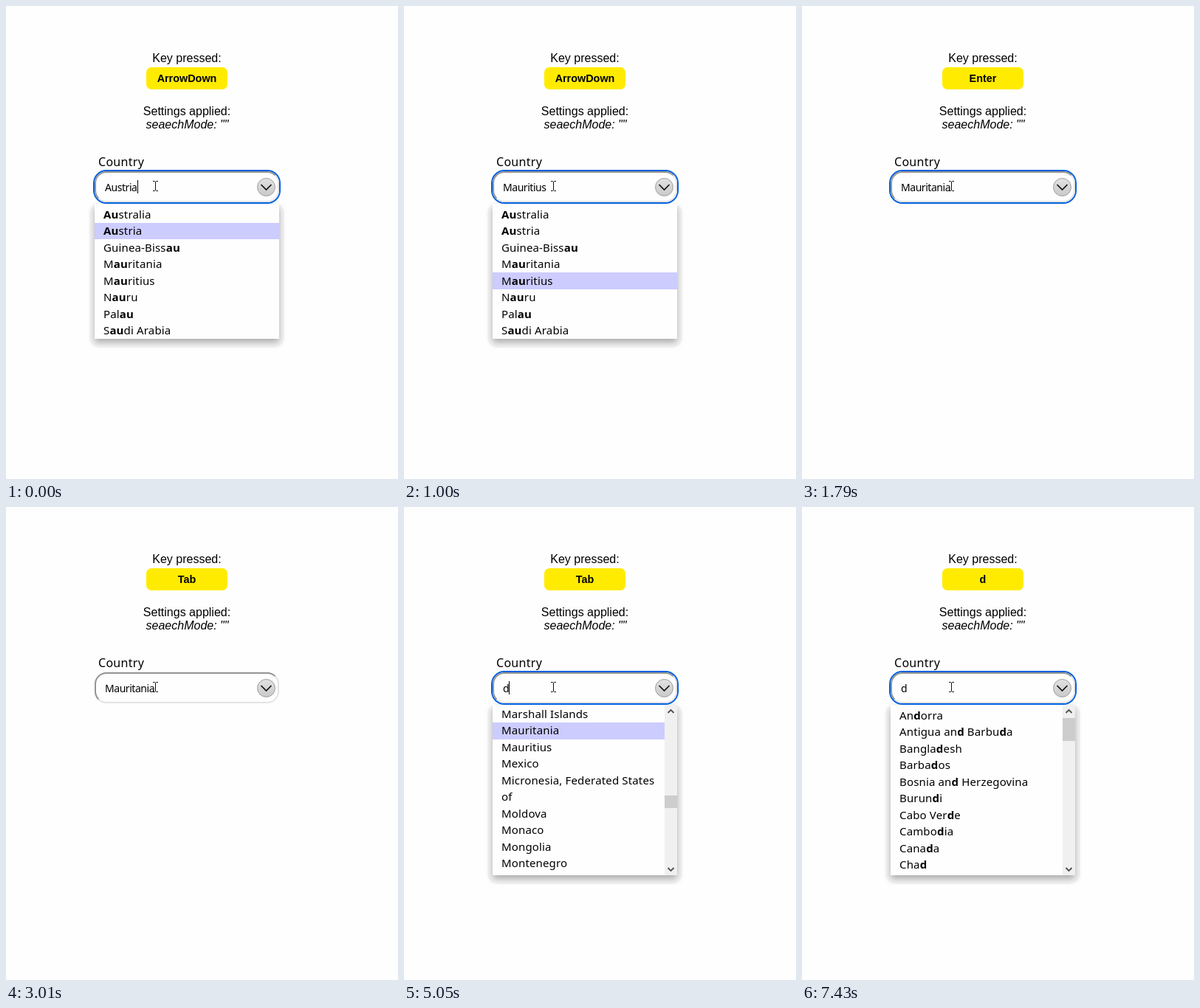
Write an HTML page that moves like this. It is 531x641 px and loops after 7.99 s.

```html
<!DOCTYPE html>
<html lang="en">
<head>
<meta charset="utf-8">
<title>Country combobox</title>
<style>
  html, body { margin: 0; width: 100%; height: 100%; overflow: hidden; background: #fefefe; }
  svg { display: block; }
  text { white-space: pre; }
  .head { font: 16px "Liberation Sans", Arial, sans-serif; text-anchor: middle; }
  .mode { font-style: italic; }
  .key { font: bold 14.4px "Liberation Sans", Arial, sans-serif; text-anchor: middle; }
  .label { font: 16px "Noto Sans", sans-serif; letter-spacing: .28px; }
  .value { font: 14px "Noto Sans", sans-serif; letter-spacing: -.45px; }
  .row { font: 15px "Noto Sans", sans-serif; letter-spacing: .15px; }
  .row tspan { font-weight: bold; }
</style>
</head>
<body>
<svg width="531" height="641" viewBox="0 0 531 641">
  <defs>
    <linearGradient id="knob" x2="0" y2="1">
      <stop stop-color="#e2e2e2"/>
      <stop offset="1" stop-color="#c9c9c9"/>
    </linearGradient>
    <filter id="soft" filterUnits="userSpaceOnUse" x="90" y="240" width="310" height="300">
      <feGaussianBlur stdDeviation="5"/>
    </filter>
    <clipPath id="view"><rect id="viewBox" x="120" y="268" width="250"/></clipPath>
  </defs>

  <text class="head" x="245" y="76">Key pressed:</text>
  <rect x="190" y="83" width="110" height="30" rx="7" fill="#ffeb00"/>
  <text class="key" id="key" x="245" y="103"></text>
  <text class="head" x="245" y="148">Settings applied:</text>
  <text class="head mode" x="245.5" y="166">seaechMode: ""</text>
  <text class="label" x="125" y="217">Country</text>

  <g id="list">
    <rect id="halo" x="113" y="267" width="264" rx="14" fill="#f5f5f5"/>
    <rect id="shade" x="120" y="273" width="250" fill-opacity=".3" filter="url(#soft)"/>
    <rect id="panel" x="120" y="268" width="250" fill="#fefefe"/>
    <g clip-path="url(#view)">
      <rect id="mark" x="120" fill="#ccf"/>
      <g id="rows"></g>
    </g>
    <g id="bar">
      <rect x="353" y="268" width="17" height="231" fill="#f0f0f0"/>
      <rect id="thumb" x="353" width="17" fill="#cdcdcd"/>
      <path d="M357.5 279l4-4 4 4M357.5 489l4 4 4-4" fill="none" stroke="#505050" stroke-width="1.8"/>
    </g>
  </g>

  <rect id="ring" x="119" y="223" width="252" height="44" rx="17" fill="#fefefe" stroke="#0060df" stroke-width="2"/>
  <g fill="none" stroke-width="2">
    <rect x="121" y="225" width="248" height="40" rx="15" fill="#fefefe" stroke="#e3e3e3"/>
    <path d="M125.4 260.6A15 15 0 0 1 121 250V240A15 15 0 0 1 136 225H354A15 15 0 0 1 364.6 229.4" stroke="#949494"/>
  </g>
  <circle cx="352.5" cy="245.5" r="12" fill="url(#knob)" stroke="#a0a0a0"/>
  <path d="M345.5 242l7 7 7-7" fill="none" stroke="#111" stroke-width="1.7"/>

  <rect id="pick" x="134" y="236" width="67" height="18" fill="#0078d7"/>
  <text class="value" id="value" x="134" y="251"></text>
  <rect id="caret" y="236" width="1" height="18"/>
  <path d="M199 237.5h2.5l1 1 1-1h2.5M202.5 238v12M199 250.5h2.5l1-1 1 1h2.5" fill="none" stroke="#111"/>
</svg>
<script>
const LOOP = 7990, PITCH = 22.5, LIST_TOP = 268;
const $ = id => document.getElementById(id);

const lists = {
  au: {
    names: ["Australia", "Austria", "Guinea-Bissau", "Mauritania", "Mauritius", "Nauru", "Palau", "Saudi Arabia"],
    top: 271.5, bottom: 451, match: /(au)/i
  },
  all: {
    names: ["Marshall Islands", "Mauritania", "Mauritius", "Mexico", "Micronesia, Federated States", "of",
      "Moldova", "Monaco", "Mongolia", "Montenegro"],
    top: 269.7, bottom: 499, thumb: [391, 17]
  },
  d: {
    names: ["Andorra", "Antigua and Barbuda", "Bangladesh", "Barbados", "Bosnia and Herzegovina", "Burundi",
      "Cabo Verde", "Cambodia", "Canada", "Chad"],
    top: 271.5, bottom: 499, match: /(d)/i, thumb: [286, 31]
  }
};

const caretAt = { "Austria": 178, "Guinea-Bissau": 223, "Mauritania": 200, "Mauritius": 191, "d": 142 };

// Each step lists only what changes at that time.
const steps = [
  [0, { key: "ArrowDown", value: "Austria", list: "au", row: 1, caret: true, focus: true, picked: false }],
  [120, { value: "Guinea-Bissau", row: 2 }],
  [330, { value: "Mauritania", row: 3 }],
  [450, { value: "Mauritius", row: 4 }],
  [940, { caret: false }],
  [1060, { key: "ArrowUp", value: "Mauritania", row: 3, caret: true }],
  [1490, { caret: false }],
  [1790, { key: "Enter", list: null }],
  [2030, { caret: true }],
  [2590, { caret: false }],
  [2830, { focus: false }],
  [3010, { key: "Tab" }],
  [3720, { focus: true, picked: true, list: "all", row: 1 }],
  [5050, { value: "d", picked: false, caret: true }],
  [5170, { key: "d", list: "d", row: -1 }],
  [5290, { caret: false }],
  [5850, { caret: true }],
  [6390, { caret: false }],
  [6940, { caret: true }],
  [7430, { caret: false }]
];

function set(id, attrs) {
  for (const name in attrs) $(id).setAttribute(name, attrs[name]);
}

function show(id, on) {
  $(id).style.display = on ? "" : "none";
}

function rowText(name, i, list) {
  const parts = list.match ? name.split(list.match) : [name];
  const marked = parts.map((p, n) => n % 2 ? `<tspan>${p}</tspan>` : p).join("");
  return `<text class="row" x="132" y="${Math.floor(list.top + 16.5 + i * PITCH)}">${marked}</text>`;
}

function drawList(list, row) {
  show("list", list);
  if (!list) return;
  const height = list.bottom - LIST_TOP;
  for (const id of ["viewBox", "panel", "shade"]) set(id, { height });
  set("halo", { height: height + 13 });
  $("rows").innerHTML = list.names.map((name, i) => rowText(name, i, list)).join("");
  show("mark", row >= 0);
  const edge = i => Math.round(list.top + i * PITCH - .01);
  const y = edge(row);
  set("mark", { y, width: list.thumb ? 233 : 250, height: edge(row + 1) - y });
  show("bar", list.thumb);
  if (list.thumb) set("thumb", { y: list.thumb[0], height: list.thumb[1] });
}

function draw(s) {
  $("key").textContent = s.key;
  $("value").textContent = s.value;
  set("value", { fill: s.picked ? "#fff" : "#000" });
  set("caret", { x: caretAt[s.value] });
  show("caret", s.caret);
  show("pick", s.picked);
  show("ring", s.focus);
  drawList(lists[s.list], s.row);
}

let start, shown = 0;

function render(t) {
  const count = steps.filter(([at]) => at <= t).length;
  if (count === shown) return;
  shown = count;
  draw(Object.assign({}, ...steps.slice(0, count).map(([, change]) => change)));
}

function frame(now) {
  start ??= now;
  render((now - start) % LOOP);
  requestAnimationFrame(frame);
}

render(0);
requestAnimationFrame(frame);
</script>
</body>
</html>
```
